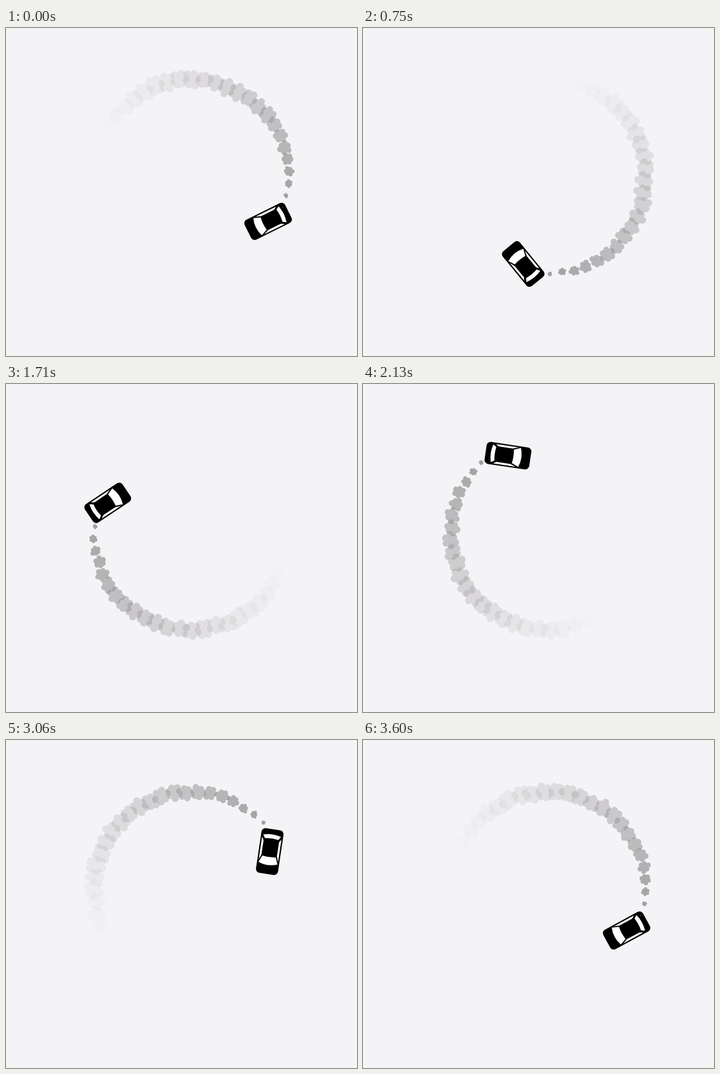
An HTML page with a canvas for the animation above (3.63 s loop, 567 by 531 pixels).

```html
<!DOCTYPE html>
<html lang="en">
<head>
<meta charset="utf-8">
<title>Drifting car</title>
<style>
  html, body { margin: 0; width: 100%; height: 100%; overflow: hidden; background: #f4f3f6; }
  canvas { display: block; }
</style>
</head>
<body>
<canvas id="stage" width="567" height="531"></canvas>
<script>
const ctx = document.getElementById('stage').getContext('2d');
const LOOP = 3630, STEP = 30;
const PUFF_GAP = 66.67, PUFF_LIFE = 1750;
const RAD = Math.PI / 180;

// time in ms, car angle on the circle in degrees, puffs emitted so far
const KEYS = [
  [0, 28.7, 0.16], [30, 28.7, 0.16], [750, 105.8, 12.05], [1290, 158.9, 20.2],
  [2130, 243.6, 32.12], [2520, 282.8, 38.09], [3060, 333.6, 46.01],
  [3600, 386.6, 54.2], [3630, 388.7, 54.6]
];

function stateAt(t) {
  const n = KEYS.findIndex(k => k[0] > t);
  const a = KEYS[n - 1], b = KEYS[n];
  const f = (t - a[0]) / (b[0] - a[0]);
  return [a[1] + (b[1] - a[1]) * f, a[2] + (b[2] - a[2]) * f];
}

function random(id, k) {
  const v = Math.sin(id * 12.9898 + k * 78.233) * 43758.5453;
  return v - Math.floor(v);
}

function shape(color, points) {
  ctx.fillStyle = color;
  ctx.beginPath();
  points.forEach(([x, y]) => ctx.lineTo(x, y));
  ctx.fill();
}

function glass(back, backHalf, front, frontHalf, backBulge, frontBulge) {
  ctx.fillStyle = '#fff';
  ctx.beginPath();
  ctx.moveTo(back, -backHalf);
  ctx.quadraticCurveTo(back + backBulge, 0, back, backHalf);
  ctx.lineTo(front, frontHalf);
  ctx.quadraticCurveTo(front + frontBulge, 0, front, -frontHalf);
  ctx.fill();
}

function drawCar(angle) {
  ctx.save();
  ctx.translate(297.8 + 143.2 * Math.cos(angle * RAD), 244.3 + 143.2 * Math.sin(angle * RAD));
  ctx.rotate((angle + 124.9) * RAD);
  ctx.fillStyle = '#000';
  ctx.beginPath();
  ctx.roundRect(-36.5, -18, 73, 36, 6.5);
  ctx.fill();
  glass(-26, 14.5, -20.5, 11, -4, -2);
  glass(8, 11, 19, 15.5, 2, 6);
  for (const side of [-1, 1]) {
    shape('#fff', [[-22, 15.8], [-17, 12.6], [6, 12.6], [15, 15.8]].map(([x, y]) => [x, y * side]));
  }
  ctx.restore();
}

function drawPuff(id, age, angle) {
  const life = age / PUFF_LIFE;
  const size = 33 * (1 - Math.exp(-age / 270));
  const wane = Math.max(0, (life - 0.76) / 0.24);
  const radius = 157 + (random(id, 1) - 0.5) * 4;
  ctx.save();
  ctx.rotate(angle * RAD);
  ctx.translate(radius, 0);
  ctx.scale(1 - 0.3 * wane, 1 - 0.6 * wane);
  ctx.globalAlpha = Math.pow(1 - life, 1.75);
  ctx.beginPath();
  ctx.arc(0, 0, size * 0.3, 0, 7);
  const turn = random(id, 2) * 6.28;
  for (let k = 0; k < 6; k++) {
    const a = turn + k * Math.PI / 3;
    const reach = size * (0.22 + 0.14 * random(id, k + 3));
    const x = reach * Math.cos(a), y = reach * Math.sin(a), r = size * 0.19;
    ctx.moveTo(x + r, y);
    ctx.arc(x, y, r, 0, 7);
  }
  ctx.fill();
  ctx.restore();
}

function drawSmoke(angle, count) {
  const newest = Math.floor(count);
  ctx.save();
  ctx.translate(299.5, 241);
  ctx.fillStyle = '#999899';
  for (let i = 26; i >= 0; i--) {
    const age = (count - newest + i) * PUFF_GAP;
    if (age < PUFF_LIFE) drawPuff(newest - i, age, angle - 9.1 - 0.1085 * age);
  }
  ctx.restore();
}

function draw(now) {
  const t = Math.floor((now % LOOP) / STEP) * STEP;
  const [angle, count] = stateAt(t);
  ctx.fillStyle = '#f4f3f6';
  ctx.fillRect(0, 0, 567, 531);
  drawCar(angle);
  drawSmoke(angle, count);
}

let start;
function frame(now) {
  start ??= now;
  draw(Math.max(0, now - start));
  requestAnimationFrame(frame);
}
draw(0);
requestAnimationFrame(frame);
</script>
</body>
</html>
```
